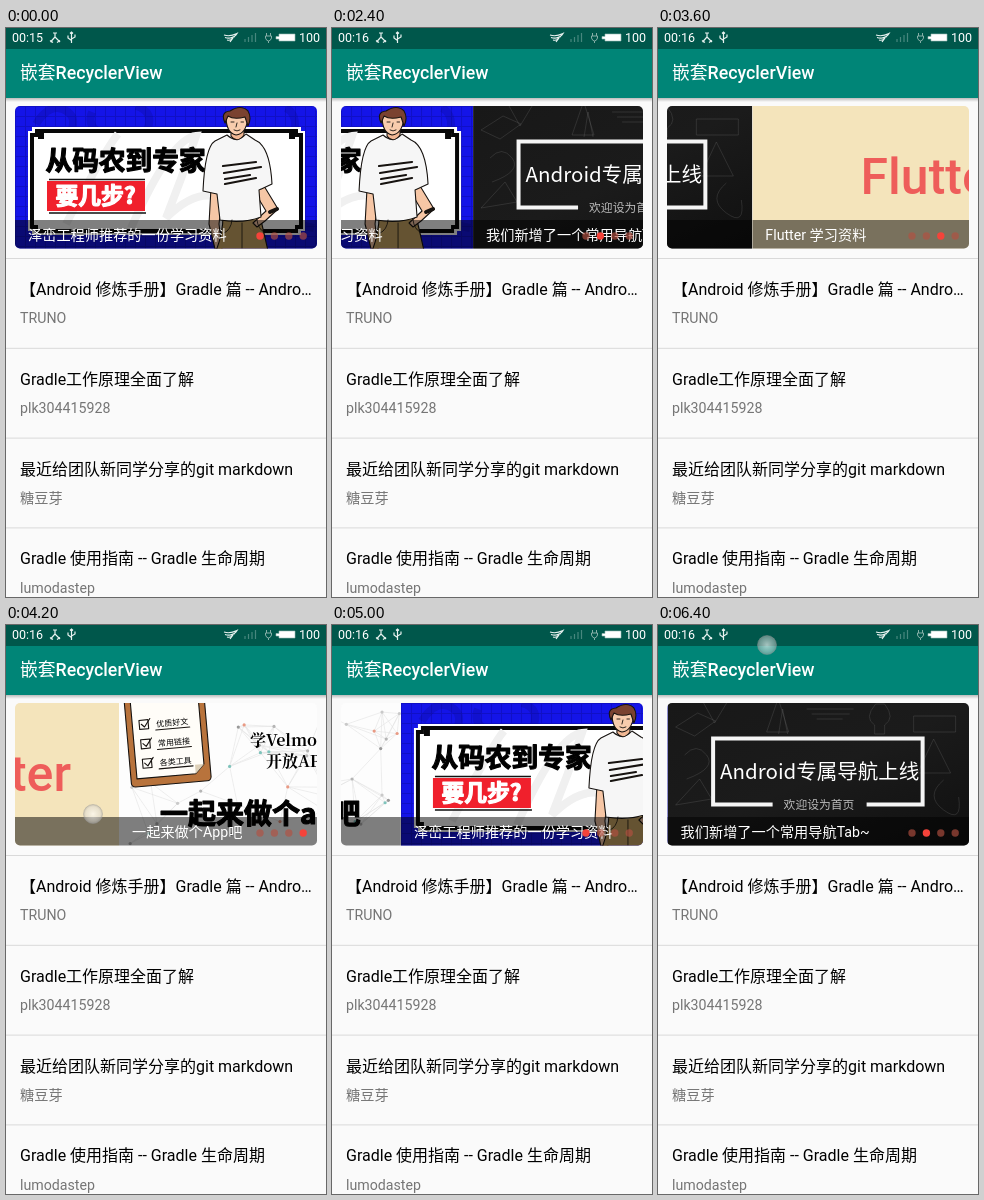
Write an HTML page that moves like this. It is 320x569 px and loops after 6.6 s.

```html
<!DOCTYPE html>
<html lang="zh-CN">
<head>
<meta charset="utf-8">
<title>Nested RecyclerView</title>
<style>
  html, body { margin: 0; width: 100%; height: 100%; overflow: hidden; background: #fafafa; }
  svg { display: block; width: 320px; height: 569px; font-family: Roboto, "Noto Sans CJK SC", sans-serif; }
  .cjk { font-family: "Noto Sans CJK SC", sans-serif; }
  .heavy { font-family: "Noto Sans CJK SC", sans-serif; font-weight: 900; stroke: #000; stroke-width: 1.2; stroke-linejoin: round; }
  .heavy.light { fill: #fff; stroke: #fff; }
  .caption { font-size: 14.2px; fill: #fff; }
  .ink { stroke: #171310; stroke-width: 1.1; stroke-linejoin: round; stroke-linecap: round; }
  .line { fill: none; }
</style>
</head>
<body>
<svg viewBox="0 0 320 569">
  <defs>
    <clipPath id="card"><rect x="9" y="78" width="302" height="142.500" rx="5"/></clipPath>
    <clipPath id="page"><rect x="9" y="78" width="302" height="143"/></clipPath>
    <pattern id="grid" width="10" height="10" patternUnits="userSpaceOnUse" x="9" y="78">
      <rect width="10" height="10" fill="#1414e8"/>
      <path d="M0 .5H10M.5 0V10" stroke="#1010c6"/>
    </pattern>
    <linearGradient id="shade" x2="0" y2="1">
      <stop stop-color="#000" stop-opacity=".25"/><stop offset="1" stop-color="#000" stop-opacity="0"/>
    </linearGradient>
    <linearGradient id="board" x2="1" y2="1">
      <stop stop-color="#181818"/><stop offset=".5" stop-color="#1b1b1b"/><stop offset="1" stop-color="#101010"/>
    </linearGradient>
    <radialGradient id="glow">
      <stop stop-color="#fff" stop-opacity=".65"/><stop offset=".75" stop-color="#ddd" stop-opacity=".5"/>
      <stop offset="1" stop-color="#aaa" stop-opacity=".55"/>
    </radialGradient>
  </defs>

  <rect width="320" height="569" fill="#fafafa"/>
  <g id="list"></g>

  <g clip-path="url(#card)">
    <g id="track">
      <g id="slide0" clip-path="url(#page)">
        <rect x="9" y="78" width="302" height="143" fill="url(#grid)"/>
        <path d="M30 96Q45 72 62 84T40 140M86 84Q80 100 98 106M130 78Q150 84 140 104M280 80Q300 90 276 140T308 200" fill="none" stroke="#08087a" stroke-opacity=".22" stroke-width="8"/>
        <path d="M26 99H295V103H299V203H295V207H26V203H22V103H26Z" fill="#fff"/>
        <path d="M29 101H292V105H297V201H292V205H29V201H24V105H29Z" fill="#080808"/>
        <path d="M32 105H289V109H293V197H289V201H32V197H28V109H32Z" fill="#fff"/>
        <path d="M125 200Q165 110 190 108Q176 150 160 190Q190 160 215 170M60 196Q100 120 112 106" fill="none" stroke="#f0f0f0" stroke-width="8"/>
        <path d="M32 105h6v6h-6zM283 105h6v6h-6z" fill="#080808"/>
        <text class="heavy" x="39.500" y="141.500" font-size="26.700">从码农到专家</text>
        <path d="M43 151.500H139M43 185H140" stroke="#111" stroke-width="1.500"/>
        <rect x="41" y="153" width="98" height="30" fill="#f0202c"/>
        <text class="heavy light" x="49.500" y="176" font-size="22.800">要几步?</text>
        <g class="ink">
          <path d="M205 160L203 196L209 221H216L213 196L217 160Z" fill="#f6c6a5"/>
          <path d="M217 188H254Q258 205 262 223H210Q217 205 217 188Z" fill="#cba764"/>
          <path d="M258 158L272 181L259 193L251 199L247 195L260 183L248 163Z" fill="#f6c6a5"/>
          <path d="M221 107L209 113Q199 119 197 163L211 166L214 192Q237 196 255 189L253 162L266 156Q264 118 249 112L240 106Q231 116 221 107Z" fill="#f6f6f6"/>
          <path d="M225 98V108Q231 116 238 107V99Z" fill="#f1b793"/>
          <path d="M220 88Q220 105 230 107Q240 106 242 90Q234 81 220 88Z" fill="#f8ccad"/>
          <path d="M219 95Q214 84 224 83Q235 76 242 83Q246 90 242 98L239 89Q228 92 222 88Z" fill="#7a4230"/>
          <path class="line" d="M225 94h3M235 94h2.500M231 95l-1 4M228 102q3 2 6 0" stroke-width=".9"/>
          <path class="line" d="M217 138L250 134M218 145L255 139M219 151L244 147M219 156L250 150" stroke-width="2.200"/>
          <path class="line" d="M264 184L271 181" stroke-width="4"/>
          <path class="line" d="M236 195V220M218 205q7-3 8-13M251 192q1 9 7 12" stroke-width=".8"/>
        </g>
        <rect x="9" y="192" width="302" height="29" fill-opacity=".5"/>
        <text class="caption" x="22" y="212">泽峦工程师推荐的一份学习资料</text>
      </g>

      <g id="slide1" transform="translate(302)" clip-path="url(#page)">
        <rect x="9" y="78" width="302" height="143" fill="url(#board)"/>
        <g fill="none" stroke="#777" stroke-opacity=".32" stroke-width=".8">
          <path d="M17 102l22-14 18 8-21 15zM45 78l11 20 12-20M118 78l-10 29h22L121 78M217 79q-12 14-1 21v9h10v-9q11-7 0-21zM255 91h42v16h-42zM275 114l17 34h-33zM26 130q12-13 22 0t-20 24M17 180l24-26 12 20zM148 84h47M153 89h38M158 94h26M285 155q-19 16 0 30t15-13M120 109l4-25 5 25"/>
        </g>
        <path d="M114 179.500H54.500V113.500H264V179.500H208" fill="none" stroke="#f5f5f5" stroke-width="4"/>
        <text class="cjk" x="61.500" y="153.500" font-size="20.500" fill="#fff">Android专属导航上线</text>
        <text class="cjk" x="125" y="184" font-size="11.800" fill="#bbb">欢迎设为首页</text>
        <rect x="9" y="192" width="302" height="29" fill-opacity=".5"/>
        <text class="caption" x="22" y="212">我们新增了一个常用导航Tab~</text>
      </g>

      <g transform="translate(604)" clip-path="url(#page)">
        <rect x="9" y="78" width="302" height="143" fill="#f4e4bb"/>
        <text x="263" y="166" text-anchor="end" font-size="50" font-weight="500" fill="#ee5d5a">Flutter</text>
        <rect x="9" y="192" width="302" height="29" fill-opacity=".5"/>
        <text class="caption" x="22" y="212">Flutter 学习资料</text>
      </g>

      <g transform="translate(906)" clip-path="url(#page)">
        <rect x="9" y="78" width="302" height="143" fill="#fdfdfd"/>
        <g id="network" stroke="#e2e2e2" stroke-width=".6"></g>
        <g transform="rotate(-5 58 118)">
          <rect class="ink" x="18" y="60" width="80" height="99" rx="4" fill="#b8733c"/>
          <path class="ink" d="M24 64H92V142L83 151H24Z" fill="#fffdf8"/>
          <path d="M92 142H83V151Z" fill="#ddd0b8"/>
          <g id="checks"></g>
        </g>
        <g style="font-family:'Noto Serif CJK SC','Noto Serif',serif" font-size="16" font-weight="700">
          <text x="140" y="121">学Velmora</text>
          <text x="156" y="142">开放API</text>
        </g>
        <text class="heavy" x="50" y="199" font-size="28">一起来做个app吧</text>
        <rect x="9" y="192" width="302" height="29" fill-opacity=".5"/>
        <text class="caption" x="22" y="212">一起来做个App吧</text>
      </g>

      <use href="#slide0" x="1208"/>
      <use href="#slide1" x="1208"/>
    </g>
    <g id="dots"></g>
  </g>

  <rect y="70" width="320" height="4" fill="url(#shade)"/>
  <rect y="21" width="320" height="49" fill="#008577"/>
  <rect width="320" height="21" fill="#00574b"/>
  <text x="14" y="51.200" font-size="17.780" font-weight="500" fill="#fff">嵌套RecyclerView</text>
  <g fill="#fff" font-size="12.500">
    <text id="clock" x="6" y="14.300"></text>
    <text x="293" y="14.300">100</text>
  </g>
  <g fill="none" stroke="#e8f2f0" stroke-width="1.200">
    <path d="M49 4.500V9L44.500 14M49 9L54 14M47 5h4M44 12.500l3 2M54 12.500l-3 2"/>
    <path d="M65.500 4V15M62 7.500V10L65.500 12.500M69 6.500V9L65.500 11M64 5.500L65.500 4L67 5.500"/>
    <path d="M218 7Q224 9 231 5.500Q229 9 224 10M219 9.500Q224 11 229 8.500M221 12q4 1 6-2l-3 4"/>
    <path d="M239 14V11M242.500 14V9M246 14V7M249.500 14V5" stroke="#47877e"/>
    <path d="M260.500 5V8M264.500 5V8M259.500 8h6v2q-1 3-3 3t-3-3zM262.500 13V15" stroke="#86aea7" stroke-width="1"/>
  </g>
  <path d="M273 6H289V13H273V11H270V8.500H273Z" fill="#fff" stroke="#9dbdb7" stroke-width=".6"/>
  <circle id="touch" r="9.500" fill="url(#glow)" stroke="#999" stroke-opacity=".4"/>
</svg>

<script>
const LOOP = 6600, STEP = 200, PAGE = 302, SETTLE = 140;
const el = id => document.getElementById(id);

const rows = [
  ['【Android 修炼手册】Gradle 篇 -- Andro…', 'TRUNO'],
  ['Gradle工作原理全面了解', 'plk304415928'],
  ['最近给团队新同学分享的git markdown', '糖豆芽'],
  ['Gradle 使用指南 -- Gradle 生命周期', 'lumodastep']
];
el('list').innerHTML = rows.map(([title, author], i) => {
  const y = 230 + i * 89.8;
  return `<rect y="${y}" width="320" height="1" fill="#d9d9d9"/>
    <text x="14" y="${y + 37}" font-size="16">${title}</text>
    <text x="14" y="${y + 65.2}" font-size="14.2" fill="#757575">${author}</text>`;
}).join('');

el('checks').innerHTML = ['优质好文', '常用链接', '各类工具'].map((label, i) => {
  const y = 93 + i * 19.5;
  return `<rect class="ink line" x="31" y="${y}" width="9" height="9"/>
    <path class="ink line" d="M33 ${y + 4}l3 3 6-8M47 ${y + 11}h34" stroke-width=".8"/>
    <text class="cjk" x="48" y="${y + 8}" font-size="8" font-weight="500">${label}</text>`;
}).join('');

let seed = 4721;
const random = () => (seed = seed * 16807 % 2147483647) / 2147483647;
const nodes = Array.from({length: 44}, () => [9 + random() * 302, 78 + random() * 142]);
const nodeColors = ['#b5b5b5', '#e99a84', '#c9c9c9', '#7fc4bc', '#999'];
let links = '';
nodes.forEach(([x, y], i) => nodes.slice(i + 1).forEach(([u, v]) => {
  if (Math.hypot(x - u, y - v) < 50) links += `M${x} ${y}L${u} ${v}`;
}));
el('network').innerHTML = `<path d="${links}"/>` + nodes.map(([x, y], i) =>
  `<circle cx="${x}" cy="${y}" r="1.6" fill="${nodeColors[i % 5]}" stroke="none"/>`).join('');

el('dots').innerHTML = [0, 1, 2, 3].map(i => `<circle cx="${254 + i * 14.4}" cy="208" r="3.700"/>`).join('');
const dots = [...el('dots').children];

// Each swipe drags one page, then the page snaps with exponential easing.
const swipes = [
  {start: 2250, lift: 2399, drag: 169, x: 260},
  {start: 3250, lift: 3550, drag: 180, x: 275},
  {start: 4020, lift: 4210, drag: 209, x: 285},
  {start: 4650, lift: 4850, drag: 127, x: 270},
  {start: 5450, lift: 5610, drag: 129, x: 263}
];

function pose(t) {
  const index = swipes.findLastIndex(s => t >= s.start);
  if (index < 0) return {scroll: 0};
  const {start, lift, drag, x} = swipes[index];
  const held = t < lift;
  const moved = held
    ? drag * (t - start) / (lift - start)
    : PAGE - (PAGE - drag) * Math.exp((lift - t) / SETTLE);
  return {scroll: index * PAGE + moved, finger: held ? [x - moved, 189] : null};
}

function draw(now) {
  const t = Math.floor(now % LOOP / STEP) * STEP;
  const {scroll, finger} = pose(t);
  const touch = t >= 6400 ? [109, 20] : finger;
  const active = Math.floor(scroll / PAGE + 0.62) % 4;
  el('track').setAttribute('transform', `translate(${-scroll})`);
  dots.forEach((dot, i) => dot.setAttribute('fill', i === active ? '#f4433a' : 'rgba(180,80,65,.65)'));
  el('clock').textContent = t < 400 ? '00:15' : '00:16';
  el('touch').setAttribute('visibility', touch ? 'visible' : 'hidden');
  if (touch) el('touch').setAttribute('transform', `translate(${touch})`);
}

const begin = performance.now();
function tick() {
  draw(performance.now() - begin);
  requestAnimationFrame(tick);
}
tick();
</script>
</body>
</html>
```
